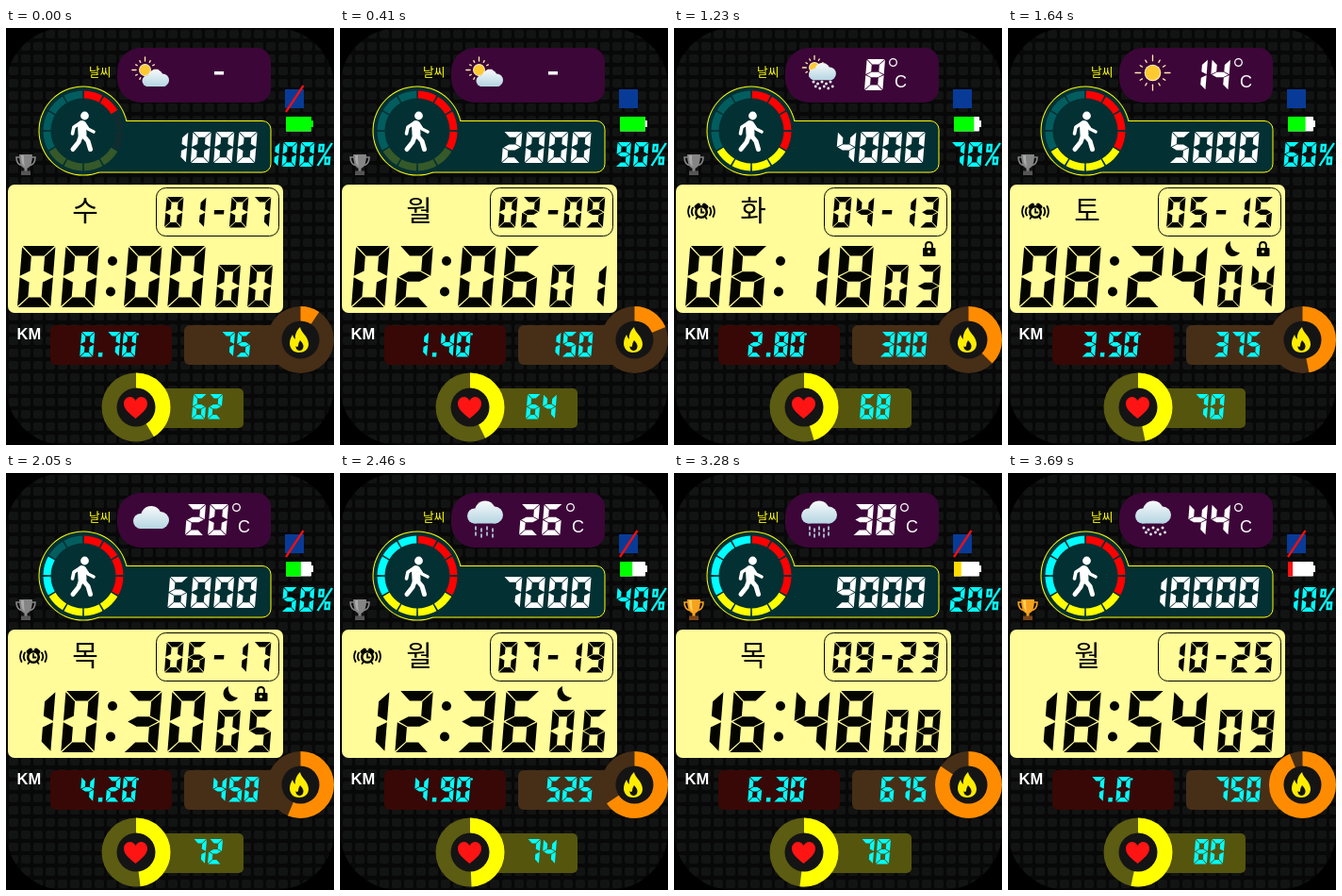
An HTML page with a canvas that plays this animation: 348 by 442 pixels, repeating every 4100 ms.

```html
<!DOCTYPE html>
<html lang="ko">
<head>
<meta charset="utf-8">
<style>
html, body { margin: 0; width: 100%; height: 100%; overflow: hidden; background: #000; }
canvas { display: block; }
</style>
</head>
<body>
<canvas id="face" width="348" height="442"></canvas>
<script>
const c = document.getElementById('face').getContext('2d');
const STEP = 410, COUNT = 10;
const CYAN = '#00ffff', INK = '#050500', DARK = '#141414';
const DAYS = '수월목화토목월토목월';
const SEGS = ['abcdef', 'bc', 'abged', 'abgcd', 'fgbc', 'afgcd', 'afgedc', 'abc', 'abcdefg', 'abcdfg'];
const KOREAN = 'px "Noto Sans CJK KR", "Noto Sans CJK", sans-serif';
const pad = n => String(n).padStart(2, '0');
const within = (i, lo, hi) => i >= lo && i <= hi;

// ---- basic shapes ----
function disc(x, y, r, fill) {
  c.fillStyle = fill;
  c.beginPath();
  c.arc(x, y, r, 0, 7);
  c.fill();
}
function box(x, y, w, h, r, fill, stroke) {
  c.beginPath();
  c.roundRect(x, y, w, h, r);
  if (fill) { c.fillStyle = fill; c.fill(); }
  if (stroke) { c.strokeStyle = stroke; c.lineWidth = 1; c.stroke(); }
}
function shape(d, fill) {
  c.fillStyle = fill;
  c.fill(new Path2D(d));
}
function line(d, color, width) {
  c.strokeStyle = color;
  c.lineWidth = width;
  c.stroke(new Path2D(d));
}
// Arc band, degrees clockwise from the top
function band(x, y, r0, r1, from, to, color) {
  const rad = a => (a - 90) * Math.PI / 180;
  c.strokeStyle = color;
  c.lineWidth = r1 - r0;
  c.lineCap = 'butt';
  c.beginPath();
  c.arc(x, y, (r0 + r1) / 2, rad(from), rad(to));
  c.stroke();
}
function label(s, x, y, font, color, align = 'left') {
  c.font = font;
  c.fillStyle = color;
  c.textAlign = align;
  c.fillText(s, x, y);
}

// ---- slanted seven segment text ----
function glyph(ch, x, y, W, H, t, color) {
  const k = .08, w = W - k * H, m = H / 2, h = t / 2, g = t > 8 ? .8 : .5;
  const cap = [g, 0, w - g, 0, w - t - g, t, t + g, t];
  const side = [0, g * 1.5, t, t + g, t, m - h - g, 0, m - g];
  const mid = [g * 2, m, t + g, m - h, w - t - g, m - h, w - g * 2, m, w - t - g, m + h, t + g, m + h];
  const poly = (p, fx, fy) => {
    c.beginPath();
    for (let n = 0; n < p.length; n += 2) c.lineTo(fx ? w - p[n] : p[n], fy ? H - p[n + 1] : p[n + 1]);
    c.fill();
  };
  const parts = {
    a: [cap], b: [side, 1], c: [side, 1, 1], d: [cap, 0, 1], e: [side, 0, 1], f: [side], g: [mid]
  };
  c.save();
  c.transform(1, 0, -k, 1, x + k * H, y);
  c.fillStyle = color;
  if (ch === '-') c.fillRect(w * .2, m - h * .8, w * .58, t * .8);
  else if (ch === '.') c.fillRect(2.5, H - t, t, t);
  else if (ch === '%') {
    c.lineCap = 'butt';
    line(`M${w} 1L1 ${H - 1}M1.5 3H5.5V9.5H1.5ZM${w - 5.5} ${H - 9.5}H${w - 1.5}V${H - 3}H${w - 5.5}Z`, color, 2.4);
  } else for (const s of SEGS[ch]) poly(...parts[s]);
  c.restore();
}
const advance = (ch, pitch) => pitch * (ch === '.' ? .62 : ch === '-' ? .87 : 1);
const textWidth = (s, pitch) => [...s].reduce((n, ch) => n + advance(ch, pitch), 0);
function digits(s, x, y, W, H, pitch, t, color) {
  for (const ch of s) {
    glyph(ch, x, y, W, H, t, color);
    x += advance(ch, pitch);
  }
}
const small = (s, x, y) => digits(s, x, y, 16, 26.5, 17, 4.4, CYAN);

// ---- icons ----
function sun(x, y, r) {
  c.lineCap = 'round';
  for (let n = 0; n < 12; n++) {
    const a = n * Math.PI / 6, p = q => `${x + Math.cos(a) * r * q} ${y + Math.sin(a) * r * q}`;
    line(`M${p(1.45)}L${p(n % 3 ? 1.75 : 2.1)}`, '#ffe9b0', 1.3);
  }
  disc(x, y, r, '#fff3c4');
  disc(x, y, r - 1, '#ffc931');
}
function cloud(x, y, s) {
  c.save();
  c.translate(x, y);
  c.scale(s, s);
  const g = c.createLinearGradient(0, 0, 0, 24);
  g.addColorStop(0, '#f7fafb');
  g.addColorStop(1, '#b5d5e2');
  disc(19, 11, 11, g);
  disc(29, 15, 9, g);
  disc(8, 16, 8, g);
  box(3, 13, 32, 11, 5, g);
  c.restore();
}
function fall(kind, x, y, n, gap) {
  c.lineCap = 'round';
  for (let k = 0; k < n; k++) {
    const px = x + k * gap, py = y + (k % 2) * 2;
    if (kind === 'rain') line(`M${px} ${py}v3M${px} ${py + 6}v3`, '#b9dce8', 1.6);
    else {
      disc(px, py + 1, 1.5, '#e8f2f6');
      disc(px + gap / 2, py + 6, 1.4, '#e8f2f6');
    }
  }
}
function weather(i) {
  if (i < 2) { sun(147.5, 44.5, 6.5); cloud(144.5, 44, .75); }
  else if (i < 4) {
    sun(149, 42, 6);
    cloud(143, 37, .76);
    fall(i === 2 ? 'rain' : 'snow', 148, 56, 5, 4.5);
  } else if (i === 4) sun(153.5, 47.5, 8.8);
  else if (i === 5) cloud(135, 35, 1);
  else {
    cloud(135, 29.5, 1);
    fall(i % 2 ? 'snow' : 'rain', 144, 57, i < 8 ? 4 : 5, i < 8 ? 6 : 5);
  }
}
function walker() {
  disc(83.5, 93, 4.4, '#fff');
  c.lineCap = c.lineJoin = 'round';
  line('M80.5 102.500L81 113', '#fff', 9);
  line('M82 114L87 120L89.500 128.500M79.500 114L77 121L71 128.500', '#fff', 5);
  line('M79 100.500L72 105L70.500 112M83 101L87 107L93 110', '#fff', 3.6);
  c.lineJoin = 'miter';
}
function trophy(won) {
  const main = won ? '#f6a21d' : '#858585', lit = won ? '#ffcf56' : '#aaa';
  c.lineCap = 'butt';
  line('M15 137H11Q11 145 18 146M27 137H31Q31 145 24 146', main, 1.6);
  shape('M14 134H28Q28 147 22.500 149V152H19.500V149Q14 147 14 134Z', main);
  shape('M16 135H19Q19 143 20 147Q16 144 16 135Z', lit);
  c.fillStyle = won ? '#7a4318' : '#555';
  c.fillRect(16, 151.5, 10, 4.5);
}
function alarm() {
  c.lineCap = 'round';
  line('M20 190.500Q17.500 194.500 20 198.500M16.500 189Q13.500 194.500 16.500 200M38 190.500Q40.500 194.500 38 198.500M41.500 189Q44.500 194.500 41.500 200', INK, 1.9);
  line('M23.500 189.500L26 187.500M34.500 189.500L32 187.500', INK, 4);
  c.beginPath();
  c.arc(29, 195, 5.8, 0, 7);
  c.lineWidth = 2.6;
  c.stroke();
  line('M29 192V195.500H31.500M25 200L23.500 202M33 200L34.500 202', INK, 1.8);
}
function lock() {
  line('M267 234V231Q267 227 270.500 227T274 231V234', INK, 2);
  box(264, 233, 13.500, 9, 1, INK);
  disc(270.5, 237, 1.5, '#fffc99');
}
const moon = () => shape('M236 226A8.300 8.300 0 1 0 246 238A10 10 0 0 1 236 226Z', INK);

function link(on) {
  box(296, 65, 20, 20, 0, '#083b98');
  c.lineCap = 'butt';
  if (!on) line('M297 89L315.500 61', '#f01010', 2.3);
}
function battery(p) {
  box(297, 94, 27, 15.5, 1, '#fff');
  c.fillStyle = p === 100 ? '#00ff00' : '#fff';
  c.fillRect(324, 98, 2, 7);
  c.fillStyle = p > 30 ? '#00ff00' : p > 10 ? '#ffdc00' : '#ff1010';
  c.fillRect(297, 94, 27 * Math.min(1, p / 100 + .09), 15.5);
}

// ---- sections ----
function backdrop() {
  c.fillStyle = '#000';
  c.fillRect(0, 0, 348, 442);
  c.save();
  c.beginPath();
  c.roundRect(0, 0, 348, 442, 62);
  c.clip();
  c.fillStyle = '#070807';
  c.fillRect(0, 0, 348, 442);
  for (let y = 2; y < 442; y += 13)
    for (let x = 3; x < 348; x += 13) box(x, y, 10, 9, 2, '#121413');
  c.restore();
}
function forecast(i) {
  box(118, 21, 163, 58, [25, 15, 15, 25], '#3c0638');
  label('날씨', 88, 50.5, 12.7 + KOREAN, '#ffff00');
  weather(i);
  if (i < 2) {
    c.fillStyle = '#fff';
    c.fillRect(221, 46, 10, 3.5);
    return;
  }
  const s = String(2 + 6 * (i - 2)), end = s.length > 1 ? 236 : 224;
  digits(s, end - 22 - 24 * (s.length - 1), 33, 22, 33, 24, 5.6, '#fff');
  c.strokeStyle = '#fff';
  c.lineWidth = 1.3;
  c.beginPath();
  c.arc(end + 8.5, 36.5, 3.8, 0, 7);
  c.stroke();
  label('C', end + 10, 63, '18px "Liberation Sans", sans-serif', '#fff');
}
function stepCount(i) {
  const s = String(1000 * (i + 1)), fill = '#033033';
  const lit = 2 * Math.min(6, 1 + Math.floor(s / 8000 * 6));
  disc(82, 109, 47.5, '#ffff00');
  box(90.5, 98.5, 190.5, 54.5, 9, fill, '#ffff00');
  disc(82, 109, 46.5, fill);
  for (let n = 0; n < 12; n++) {
    const kind = Math.floor(n / 4);
    c.globalAlpha = n < lit ? 1 : [.05, .2, .22][kind];
    band(82, 109, 34.5, 42.5, n * 30 + 1.2, n * 30 + 28.8, ['#ff0000', '#ffff00', '#00ffff'][kind]);
  }
  c.globalAlpha = 1;
  walker();
  digits(s, 269 - 24.4 * s.length, 110, 22, 33, 24.4, 5.8, '#fff');
  trophy(i >= 7);
}
function clock(i) {
  box(2, 166, 292, 136, 7, '#fffc99');
  box(159.5, 169.5, 130, 51, 10, null, INK);
  label(DAYS[i], 84, 204, 30 + KOREAN, INK, 'center');
  digits(pad(i + 1) + '-' + pad(7 + 2 * i), 168, 179, 20.5, 32.5, 24, 5.4, INK);
  const big = (s, x) => digits(s, x, 231, 40.5, 65, 46.3, 10.5, INK);
  big(pad(2 * i), 12);
  big(pad(6 * i), 125);
  disc(113, 247, 5, INK);
  disc(111, 279.5, 5, INK);
  digits(pad(i), 222, 251, 27, 45, 34, 7.3, INK);
  if (within(i, 3, 6)) alarm();
  if (within(i, 2, 5)) lock();
  if (within(i, 4, 7)) moon();
}
function distance(i) {
  label('KM', 11.5, 329.5, 'bold 16.5px "Liberation Sans", sans-serif', '#fff');
  box(47, 315, 129, 42, 6, '#380806');
  const s = i === 9 ? '7.0' : (.7 * (i + 1)).toFixed(2);
  const w = textWidth(s, 17), x = 109 - w / 2;
  small(s, x, 322);
  disc(x + w, 324.5, 1.2, CYAN);
}
function energy(i) {
  const v = 75 * (i + 1), s = String(v);
  box(189, 315, 110, 42, 6, '#472e16');
  disc(312.5, 330.5, 35.5, '#472e16');
  band(312.5, 330.5, 19, 35.5, 0, v / 800 * 360, '#ff8c00');
  disc(312.5, 330.5, 20, DARK);
  shape('M312 317C313 323 321 327 321 335C321 341 316 344 311 344C305 344 301 340 301 334C301 330 303 327 304 325Q305 329 307 330C306 325 309 320 312 317Z', '#ffed00');
  shape('M312 331Q316 335 315.500 338Q315 342 311 342Q307 341 307.500 337Q309 339 310 337Q310 334 312 331Z', DARK);
  small(s, 244 - 8.5 * s.length, 322);
}
function pulse(i) {
  const v = 62 + 2 * i;
  box(145, 382, 107, 42, 5, '#55550e');
  disc(138, 402, 36.5, '#5c5c12');
  band(138, 402, 20, 36.5, 0, v / 150 * 360, '#ffff00');
  disc(138, 402, 20.5, DARK);
  shape('M137.500 414C132 409 125 405 125 398C125 391 134 388 137.500 395C141 388 150 391 150 398C150 405 143 409 137.500 414Z', '#ff1414');
  small(String(v), 197, 388);
}
function power(i) {
  const p = 100 - 10 * i, s = p + '%';
  link(within(i, 1, 4));
  battery(p);
  digits(s, 348 - 18.5 * s.length, 121, 16.5, 26, 18.5, 4.4, CYAN);
}

function draw() {
  const i = Math.floor(performance.now() / STEP) % COUNT;
  backdrop();
  for (const part of [forecast, stepCount, clock, distance, energy, pulse, power]) part(i);
  requestAnimationFrame(draw);
}
draw();
</script>
</body>
</html>
```
